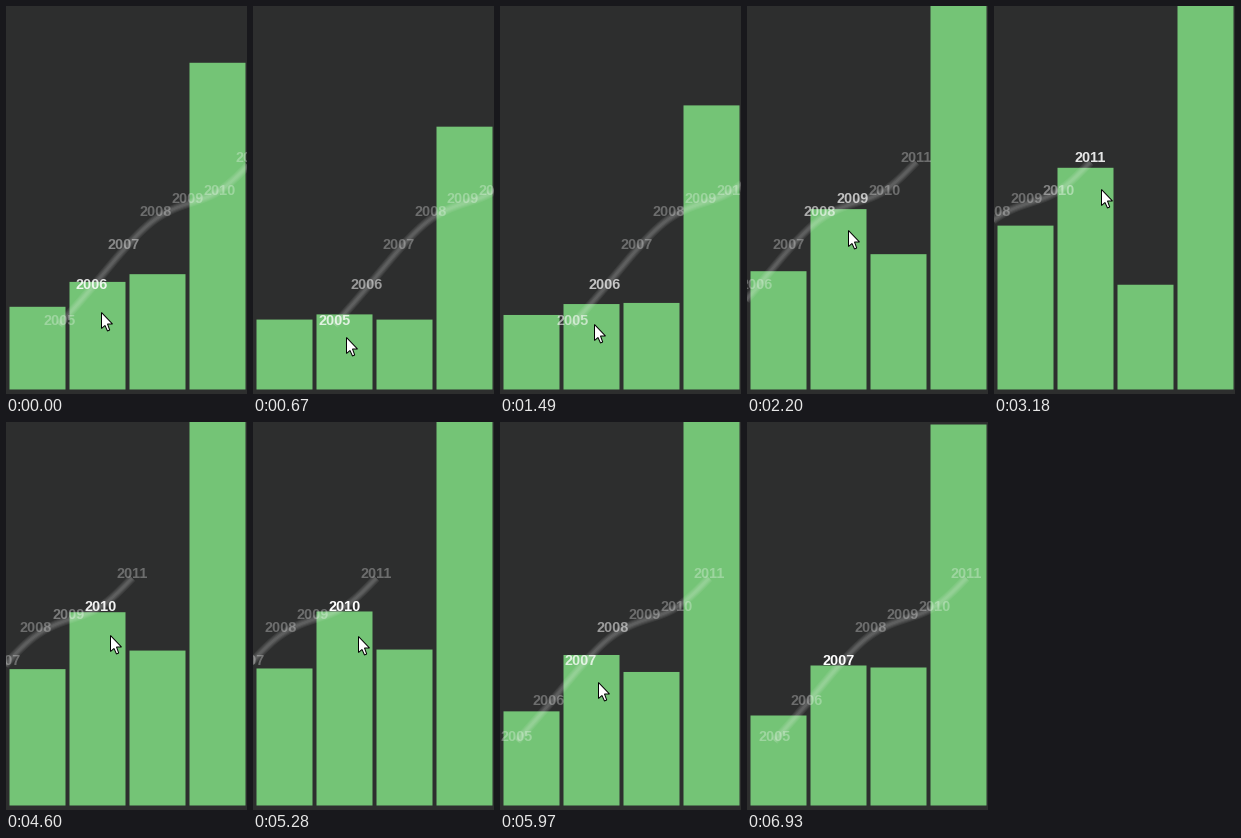
Write a matplotlib script that moves like this. It is 241 px wide and 388 px high and loops after 7170 ms.

```python
import matplotlib.pyplot as plt
import numpy as np
from matplotlib.animation import FuncAnimation
from matplotlib.patches import Polygon, Rectangle

W, H, DPI = 241, 388, 100
LOOP, INTERVAL = 7170, 30
TICK, PHASE = 139, 25  # the picture updates in coarse steps

BG, GREEN = "#2d2e2e", "#74c476"
BASE, BAR_X, BAR_W, BAR_STEP = 383.5, 3.5, 56, 60
FOCUS_X, YEAR_DX = 91.3, 32

# Bar tops, one value per year from 2005
years = np.arange(7)
left = [318, 302, 293, 280, 253, 246, 214]
dragged = [319, 283, 243, 210, 197, 189, 156]
third = [331, 273, 245, 259, 239, 227, 288]
right = 143 - 77.5 * years + 3.5 * years**2
series = [left, dragged, third, right]

# Drag legs: start ms, end ms, year reached, pointer distance below the bar top
START = (1.19, 31)
LEGS = [
    (0, 1060, 0, 20),
    (1215, 3172, 5.84, 22),
    (3320, 4000, 3.22, 22),
    (4150, 4850, 5.64, 24),
    (5120, 6235, 1.7, 28),
    (6235, 6900, 2, 150),
]

ARROW = [(0, 0), (0, 16), (3.5, 13), (6, 18.5), (8.2, 17.5), (6, 11.5), (11, 11.5)]


def px(size):
    return size * 72 / DPI


def drag_state(ms):
    """Year and pointer distance, eased out along each leg."""
    state = np.array(START)
    for start, end, *goal in LEGS:
        u = np.clip((ms - start) / (end - start), 0, 1)
        state = state + (goal - state) * (1 - (1 - u) ** 1.35)
    return state


def b_spline(values, n=16):
    """Uniform cubic B-spline with its ends pinned."""
    p = np.concatenate([[values[0]] * 2, values, [values[-1]] * 2])
    u = np.linspace(0, 1, n)
    weights = [(1 - u)**3, 3 * u**3 - 6 * u**2 + 4,
               -3 * u**3 + 3 * u**2 + 3 * u + 1, u**3]
    return np.concatenate([sum(w * v for w, v in zip(weights, p[i:i + 4])) / 6
                           for i in range(len(p) - 3)])


fig = plt.figure(figsize=(W / 100, H / 100), dpi=DPI, facecolor=BG)
ax = fig.add_axes([0, 0, 1, 1])
ax.set_xlim(0, W)
ax.set_ylim(H, 0)
ax.axis("off")

bars = [ax.add_patch(Rectangle((BAR_X + i * BAR_STEP, 0), BAR_W, 1,
                               fc=GREEN, lw=0, snap=False))
        for i in range(len(series))]

# Stacked strokes give the trail its soft edge
curve_t, curve_y = b_spline(years), b_spline(dragged)
trail = [ax.plot([], [], color="white", alpha=0.065, lw=px(w),
                 solid_capstyle="butt", solid_joinstyle="round")[0]
         for w in np.arange(2.5, 9, 2)]

labels = [ax.text(0, y, str(2005 + i), color="white", family="Liberation Sans",
                  weight="bold", size=px(14.4), ha="center", va="baseline",
                  clip_on=True)
          for i, y in enumerate(dragged)]

pointer = ax.add_patch(Polygon(ARROW, fc="white", ec="black", lw=px(1),
                               joinstyle="miter"))


def update(k):
    ms = (k + 1) * INTERVAL - 1
    year, grip = drag_state(max(0, (ms + PHASE) // TICK * TICK - PHASE))

    tops = [np.interp(year, years, row) + 0.5 for row in series]
    for bar, top in zip(bars, tops):
        bar.set_y(top)
        bar.set_height(BASE - top)

    for line in trail:
        line.set_data(FOCUS_X + (curve_t - year) * YEAR_DX, curve_y)

    for i, label in enumerate(labels):
        label.set_x(FOCUS_X + (i - year) * YEAR_DX)
        label.set_alpha(1 - 0.7 * min(1, abs(i - year)))

    tip = np.floor([93 + 2.4 * year, tops[1] + grip]) + 0.5
    pointer.set_xy(ARROW + tip)
    return [*bars, *trail, *labels, pointer]


anim = FuncAnimation(fig, update, frames=LOOP // INTERVAL, interval=INTERVAL,
                     repeat=True, repeat_delay=0, blit=False)
plt.show()
```
